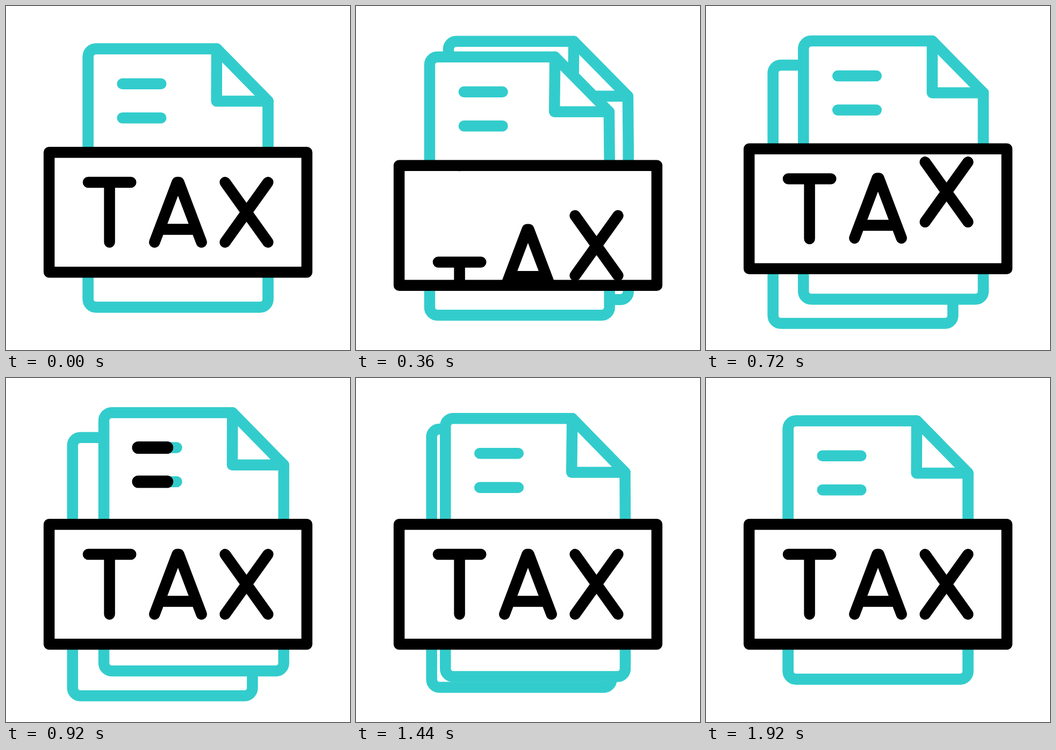
Recreate the animation shown at these times as an HTML page. Size 640x640 px, loop 2000 ms.

```html
<!DOCTYPE html>
<html lang="en">
<head>
<meta charset="utf-8">
<title>Tax document</title>
<style>
  html, body { margin: 0; width: 100%; height: 100%; overflow: hidden; background: #fff; }
  svg { display: block; width: 100%; height: 100%; }
  svg * { stroke-width: 20.5; stroke-linecap: round; stroke-linejoin: round; }
  .page { fill: #fff; stroke: #33cccc; }
  .fold, .rows { fill: none; stroke: #33cccc; }
  .ink { fill: none; stroke: #000; }
  .ink.thick { stroke-width: 23; }
  .plate { fill: #fff; }
</style>
</head>
<body>
<svg viewBox="0 0 640 640">
  <defs>
    <clipPath id="window"><rect x="80" y="272.3" width="480" height="223"/></clipPath>
    <path id="T" d="M153 328H232.3M192.6 328V439.5"/>
    <path id="A" d="M276.3 439.5L318.5 328H321.5L363.7 439.5M289 415.5H351"/>
    <path id="X" d="M407.6 328L487.4 439.5M487.4 328L407.6 439.5"/>
  </defs>
  <g id="back"><path class="page"/><path class="fold"/></g>
  <g id="front">
    <path class="page"/><path class="fold"/>
    <path class="rows" d="M216.7 144.8H288.3M216.7 208.3H288.3"/>
    <path class="ink thick" id="sweep"/>
  </g>
  <g id="band">
    <rect class="plate" x="80.2" y="272.3" width="479.6" height="223"/>
    <g class="ink" id="letters" clip-path="url(#window)"></g>
    <rect class="ink" x="80.2" y="272.3" width="479.6" height="223"/>
  </g>
</svg>
<script>
const LOOP = 2000, STEP = 40, WRAP = 291;
const $ = id => document.getElementById(id);
const lerp = (a, b, k) => a + (b - a) * k;
const ease = k => (1 - Math.cos(Math.PI * Math.min(1, Math.max(0, k)))) / 2;
const between = (t, from, to) => ease((t - from) / (to - from));

// keys: [time, value or list of values], eased from one to the next
function track(keys, t) {
  let i = 0;
  while (i < keys.length - 2 && t >= keys[i + 1][0]) i++;
  const [t0, a] = keys[i], [t1, b] = keys[i + 1], k = between(t, t0, t1);
  return Array.isArray(a) ? a.map((v, n) => lerp(v, b[n], k)) : lerp(a, b, k);
}

// Both pages swap past each other, rest apart, then swap back.
const swing = (crossed, apart) => [
  [80, [0, 0]], [260, crossed], [280, crossed], [760, apart],
  [1285, apart], [1685, crossed], [1888, [0, 0]]
];
const frontMove = swing([-19, 17.2], [29.3, -15.3]);
const backMove = swing([22.7, -17.2], [-29, 31]);

// Shifts of the folded corner: top x, inner x, inner y, right x, right y
const flat = [0, 0, 0, 0, 0];
const large = [-10, -12.3, 9.8, -1.3, 10];
const small = [6.1, 9.8, -10.8, 0.7, -10.8];
const foldMove = [
  [80, flat], [260, large], [280, large], [520, small], [760, flat],
  [1285, flat], [1685, large], [1888, flat]
];

const bandMove = [[80, 0], [525, 35], [760, -9.6], [910, 0]];

// Each letter drops out below and comes back in from above.
const letters = [['T', 80, 698], ['A', 189, 742], ['X', 208, 858]].map(([id, from, to]) => {
  const copies = [0, 1].map(() => {
    const use = document.createElementNS('http://www.w3.org/2000/svg', 'use');
    use.setAttribute('href', '#' + id);
    return $('letters').appendChild(use);
  });
  return { copies, from, to };
});

const move = (el, x, y) => el.setAttribute('transform', `translate(${x} ${y})`);

function drawPage(group, [x, y], [topX, innerX, innerY, rightX, rightY]) {
  const top = `${392 + topX} 79.8`;
  const inner = `${391.7 + innerX} ${177 + innerY}`;
  const right = `${487.4 + rightX} ${177 + rightY}`;
  move(group, x, y);
  group.querySelector('.page').setAttribute('d',
    `M${top}H167.3A14.5 14.5 0 0 0 152.8 94.3V545.7A14.5 14.5 0 0 0 167.3 560.2` +
    `H472.9A14.5 14.5 0 0 0 487.4 545.7V272L${right}Z`);
  group.querySelector('.fold').setAttribute('d', `M${top}L${inner}L${right}`);
}

function drawSweep(t) {
  const tail = lerp(216.7, 288.3, between(t, 1000, 1240));
  const head = lerp(216.7, 288.3, between(t, 760, 1000));
  const shown = t > 760 && t < 1240;
  $('sweep').setAttribute('d', shown ? `M${tail} 144.8H${head}M${tail} 208.3H${head}` : '');
}

function draw(t) {
  const fold = track(foldMove, t);
  drawPage($('back'), track(backMove, t), fold);
  drawPage($('front'), track(frontMove, t), fold);
  drawSweep(t);
  move($('band'), 0, track(bandMove, t));
  for (const { copies, from, to } of letters) {
    const drop = WRAP * between(t, from, to);
    copies.forEach((copy, n) => move(copy, 0, drop - n * WRAP));
  }
}

const start = performance.now();
function tick() {
  const t = (performance.now() - start) % LOOP;
  draw(Math.floor(t / STEP) * STEP);
  requestAnimationFrame(tick);
}
tick();
</script>
</body>
</html>
```
